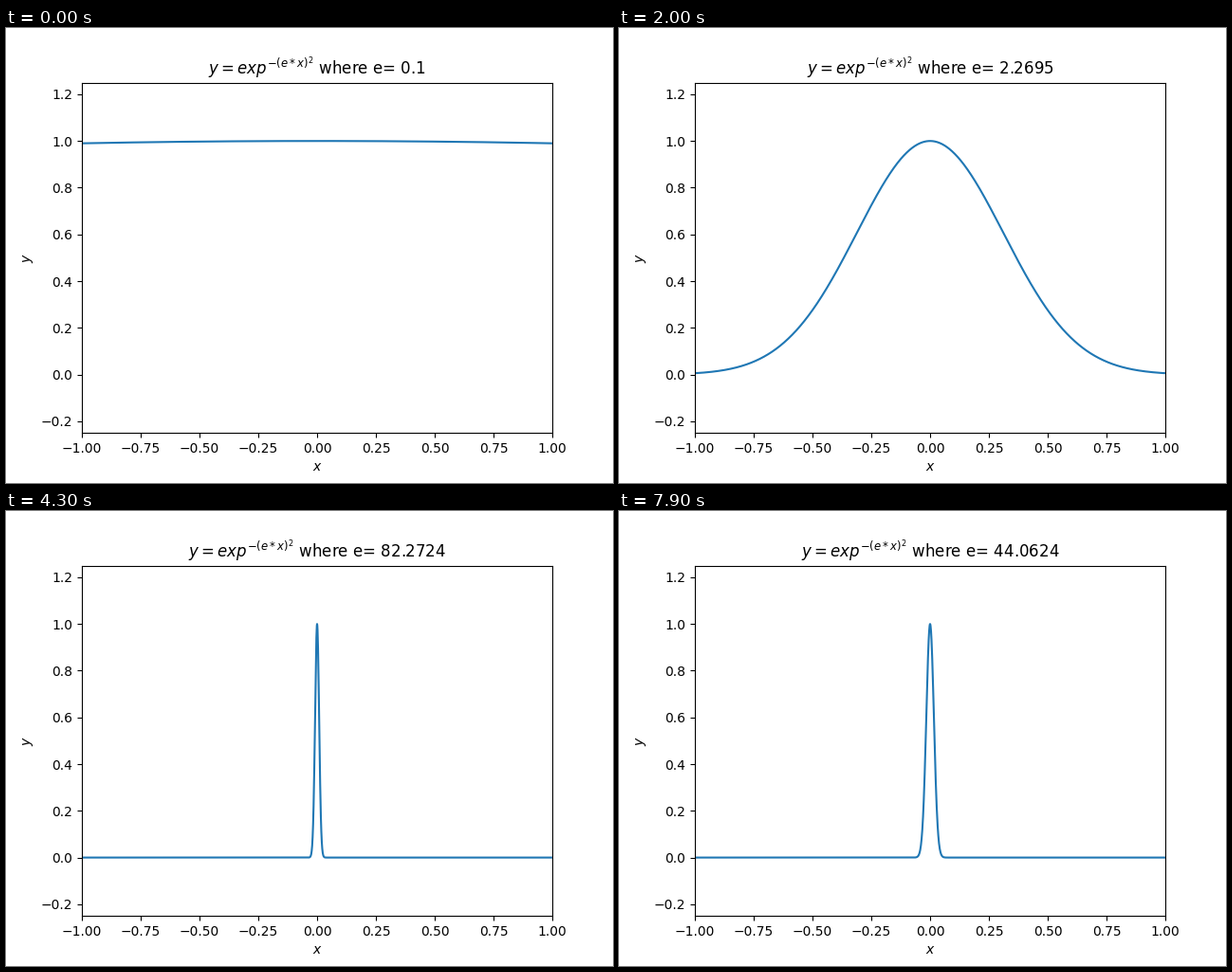
These frames come from a looping animation (640 px wide and 480 px high, 8000 ms). A matplotlib script:

```python
import numpy as np
import matplotlib.pyplot as plt
from matplotlib.animation import FuncAnimation

FRAMES = 80
INTERVAL = 100  # ms

# Shape parameter rises from 0.1 to 1000 on a log scale, then runs back down.
RISE = np.logspace(-1, 3, 60)
PEAK = len(RISE) - 1

x = np.linspace(-1, 1, 2001)

fig, ax = plt.subplots(figsize=(6.4, 4.8), dpi=100)
ax.set_xlim(-1, 1)
ax.set_ylim(-0.25, 1.25)
ax.set_xlabel("$x$")
ax.set_ylabel("$y$")
line, = ax.plot([], [], color="tab:blue", lw=1.5)
title = ax.set_title("")


def shape_at(i):
    return float(RISE[PEAK - abs(PEAK - i)])


def update(i):
    e = shape_at(i)
    line.set_data(x, np.exp(-(e * x) ** 2))
    title.set_text(r"$y=exp^{-(e*x)^2}$ where e= " + str(round(e, 4)))
    return line, title


anim = FuncAnimation(fig, update, frames=FRAMES, interval=INTERVAL,
                     repeat=True, repeat_delay=0, blit=False)
plt.show()
```
